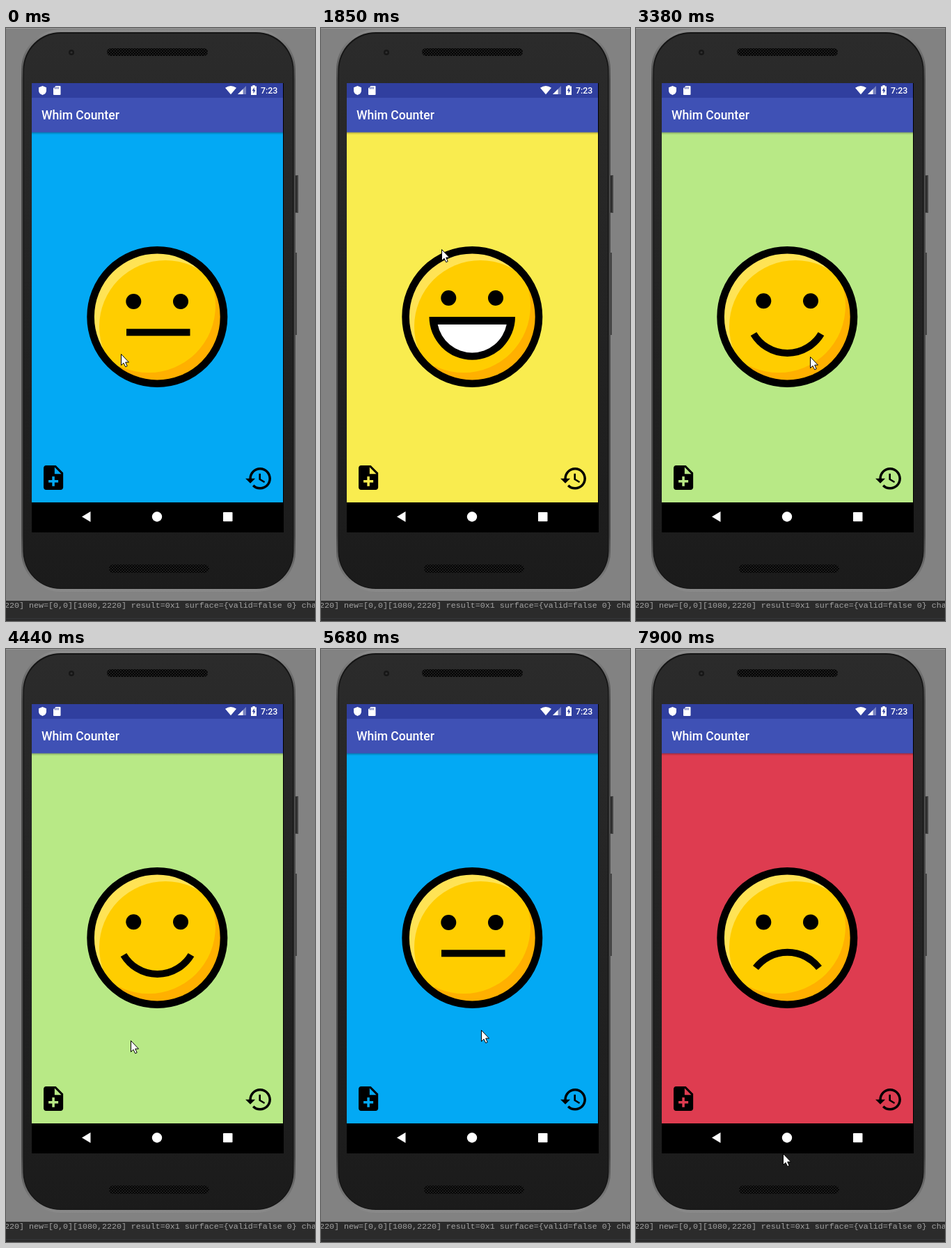
An HTML page for the animation above (8 s loop, 444 by 850 pixels).

```html
<!DOCTYPE html>
<html lang="en">
<head>
<meta charset="utf-8">
<title>Mood swipe</title>
<style>
  html, body { margin: 0; width: 100%; height: 100%; overflow: hidden; background: #828282; }
  svg { display: block; width: 444px; height: 850px; }
  .ui { font-family: Roboto, sans-serif; font-weight: 500; fill: #fff; }
  .log { font: 11.667px "Liberation Mono", monospace; fill: #a2a2a2; white-space: pre; }
  .mouth { fill: none; stroke: #000; stroke-width: 10; }
  .mood { display: none; }
</style>
</head>
<body>
<svg viewBox="0 0 444 850">
  <defs>
    <linearGradient id="rim" x2="0" y2="1">
      <stop offset="0" stop-color="#8e8e8e"/>
      <stop offset=".09" stop-color="#4a4a4a"/>
      <stop offset=".9" stop-color="#4a4a4a"/>
      <stop offset="1" stop-color="#8a8a8a"/>
    </linearGradient>
    <linearGradient id="body" x2="0" y2="1">
      <stop offset="0" stop-color="#2b2b2b"/>
      <stop offset=".5" stop-color="#232323"/>
      <stop offset="1" stop-color="#1b1b1b"/>
    </linearGradient>
    <linearGradient id="shade" x2="0" y2="1">
      <stop offset="0" stop-opacity=".3"/>
      <stop offset="1" stop-opacity="0"/>
    </linearGradient>
    <pattern id="mesh" width="4" height="4" patternUnits="userSpaceOnUse">
      <rect width="4" height="4" fill="#1c1c1c"/>
      <circle cx="1" cy="1" r="1.1"/><circle cx="3" cy="3" r="1.1"/>
    </pattern>
    <clipPath id="disc"><circle cx="217.3" cy="414" r="93"/></clipPath>
  </defs>

  <rect width="444" height="850" fill="#828282"/>
  <path d="M0 .5H444" stroke="#999"/>

  <!-- log strip -->
  <rect y="821" width="444" height="29" fill="#2b2b2b"/>
  <path d="M0 846.5H444" stroke="#353739"/>
  <text class="log" x="-2" y="831">220] new=[0,0][1080,2220] result=0x1 surface={valid=false 0} cha</text>

  <!-- phone -->
  <path d="M415 211h5v54h-5zM415 322h3v118h-3z" fill="#444"/>
  <path d="M415 212h3v52h-3z" fill="#2a2a2a"/>
  <rect x="22" y="2" width="394" height="806" rx="57" fill="url(#rim)"/>
  <rect x="24.5" y="6" width="389" height="798" rx="54" fill="#151515"/>
  <rect x="26" y="8" width="386" height="795" rx="53" fill="url(#body)"/>
  <circle cx="94" cy="35" r="4" fill="#171717"/>
  <circle cx="94" cy="35" r="1.6" fill="#303030"/>
  <rect x="145" y="29" width="145" height="11" rx="5.5" fill="url(#mesh)"/>
  <rect x="148" y="769" width="144" height="12" rx="6" fill="url(#mesh)"/>

  <!-- screen -->
  <rect x="37" y="79" width="362" height="644"/>
  <rect id="page" x="37" y="149" width="361" height="531"/>
  <rect x="37" y="149" width="361" height="4" fill="url(#shade)"/>
  <rect x="37" y="79" width="361" height="21" fill="#303f9f"/>
  <rect x="37" y="100" width="361" height="49.5" fill="#3f51b5"/>
  <text class="ui" x="51" y="131" font-size="17.57">Whim Counter</text>
  <text class="ui" x="366" y="94" font-size="12.4">7:23</text>
  <g fill="#fff">
    <path d="M52.5 83l5.5 2.3v4.2c0 3.2-2.3 5.700-5.500 6.500c-3.200-.8-5.500-3.300-5.500-6.500v-4.200z"/>
    <path d="M71.500 83h6a1 1 0 0 1 1 1v11a1 1 0 0 1-1 1h-8.500a1 1 0 0 1-1-1v-8.500z"/>
    <path d="M315 85.700q8-5.400 16 0l-8 9.600z"/>
    <path d="M345 83v12h-12z" opacity=".35"/>
    <path d="M340.500 87.500v7.500h-7.500z"/>
    <path d="M354.300 82h3.400v1.500h2.300v12.500h-8v-12.500h2.300z"/>
    <path d="M109 700.500l12.500-7.500v15z"/>
    <circle cx="217" cy="700.500" r="7.200"/>
    <rect x="312" y="694" width="13.500" height="13.300" rx=".8"/>
  </g>
  <path d="M70.500 84.500v3M72.800 84.500v3M75 84.500v3" stroke="#303f9f" stroke-width="1"/>
  <path d="M356.700 85l-3 5h1.800v4l3-5.200h-1.800z" fill="#303f9f"/>

  <!-- bottom actions -->
  <path transform="translate(47 623.400) scale(1.757)" d="M14 2H6c-1.100 0-1.990.9-1.990 2L4 20c0 1.100.89 2 1.990 2H18c1.100 0 2-.9 2-2V8l-6-6zm2 14h-3v3h-2v-3H8v-2h3v-3h2v3h3v2zm-3-7V3.500L18.500 9H13z"/>
  <path transform="translate(342.300 624.700) scale(1.757)" d="M13 3c-4.970 0-9 4.030-9 9H1l3.890 3.890.07.14L9 12H6c0-3.870 3.130-7 7-7s7 3.130 7 7-3.130 7-7 7c-1.930 0-3.680-.79-4.940-2.060l-1.420 1.420C8.270 19.990 10.510 21 13 21c4.970 0 9-4.030 9-9s-4.030-9-9-9zm-1 5v5l4.280 2.540.72-1.210-3.500-2.080V8H12z"/>

  <!-- face -->
  <g clip-path="url(#disc)">
    <rect x="116" y="313" width="203" height="203" fill="#ffe355"/>
    <circle cx="229" cy="428" r="95" fill="#ffcd00"/>
    <path d="M116 313h203v203h-203zM109 398a96 96 0 0 0 192 0a96 96 0 0 0-192 0z" fill="#ffb000" fill-rule="evenodd" clip-path="url(#lower)"/>
  </g>
  <clipPath id="lower"><path d="M319 340V516H130z"/></clipPath>
  <circle cx="217.300" cy="414" r="95.700" fill="none" stroke="#000" stroke-width="10.600"/>
  <g id="eyes"><circle cx="183.300" r="11"/><circle cx="251" r="11"/></g>
  <g class="mood" id="neutral"><path class="mouth" d="M173 436.300H264.500"/></g>
  <g class="mood" id="happy"><path class="mouth" d="M169 438.500A56.500 56.500 0 0 0 266 438.500"/></g>
  <g class="mood" id="joyful">
    <path d="M155.500 414H279A61.700 61.700 0 0 1 155.500 414z"/>
    <path d="M167.700 425H266.700A50.500 50.500 0 0 1 167.700 425z" fill="#fff"/>
  </g>
  <g class="mood" id="upset"><path class="mouth" d="M161.700 449.300L272.700 426"/></g>
  <g class="mood" id="sad"><path class="mouth" d="M172 457A57.500 57.500 0 0 1 263 457"/></g>

  <path id="cursor" d="M.5.5V16.500L4 13.200L6.700 18.700L9.200 17.600L6.700 12.100H11.500z" fill="#fff" stroke="#000"/>
</svg>

<script>
  const LOOP = 8000;

  // name: page colour, eye height
  const looks = {
    neutral: ['#03a9f4', 392],
    happy: ['#b8e986', 391.300],
    joyful: ['#f9ec4f', 387],
    upset: ['#9b9b9b', 392],
    sad: ['#de3c50', 391.500]
  };

  const moods = [
    [0, 'neutral'], [700, 'happy'], [1850, 'joyful'], [3380, 'happy'],
    [4590, 'neutral'], [5800, 'upset'], [7040, 'sad']
  ];

  // time, x, y: the pointer jumps and holds
  const moves = [
    [0, 165, 467], [120, 185, 506], [430, 199, 420], [550, 160, 291], [700, 155, 265],
    [950, 154, 310], [1070, 149, 440], [1190, 143, 580], [1310, 140, 645],
    [1610, 148, 590], [1730, 163, 430], [1850, 173, 317],
    [2100, 183, 299], [2220, 195, 307], [2370, 221, 264], [2620, 217, 228], [2740, 212, 201],
    [3140, 230, 330], [3260, 250, 471],
    [3650, 252, 300], [3770, 242, 180], [3920, 225, 172],
    [4200, 217, 250], [4320, 196, 440], [4440, 179, 561],
    [4740, 213, 441], [4890, 226, 309], [5040, 223, 230], [5160, 217, 179],
    [5440, 219, 250], [5560, 226, 430], [5680, 230, 546],
    [6100, 234, 424], [6250, 222, 280], [6370, 197, 207],
    [6770, 188, 400], [6890, 179, 573],
    [7480, 176, 640], [7600, 203, 738], [7750, 210, 729], [7900, 211, 723]
  ];

  const $ = id => document.getElementById(id);
  const at = (steps, t) => steps.findLast(s => s[0] <= t);
  let shown;

  function showMood(name) {
    if (name === shown) return;
    if (shown) $(shown).style.display = 'none';
    $(name).style.display = 'inline';
    const [color, eyeY] = looks[name];
    $('page').setAttribute('fill', color);
    $('eyes').setAttribute('transform', `translate(0 ${eyeY})`);
    shown = name;
  }

  const start = performance.now();

  function draw(now) {
    const t = Math.max(0, now - start) % LOOP;
    const [, x, y] = at(moves, t);
    showMood(at(moods, t)[1]);
    $('cursor').setAttribute('transform', `translate(${x} ${y})`);
    requestAnimationFrame(draw);
  }
  draw(start);
</script>
</body>
</html>
```
